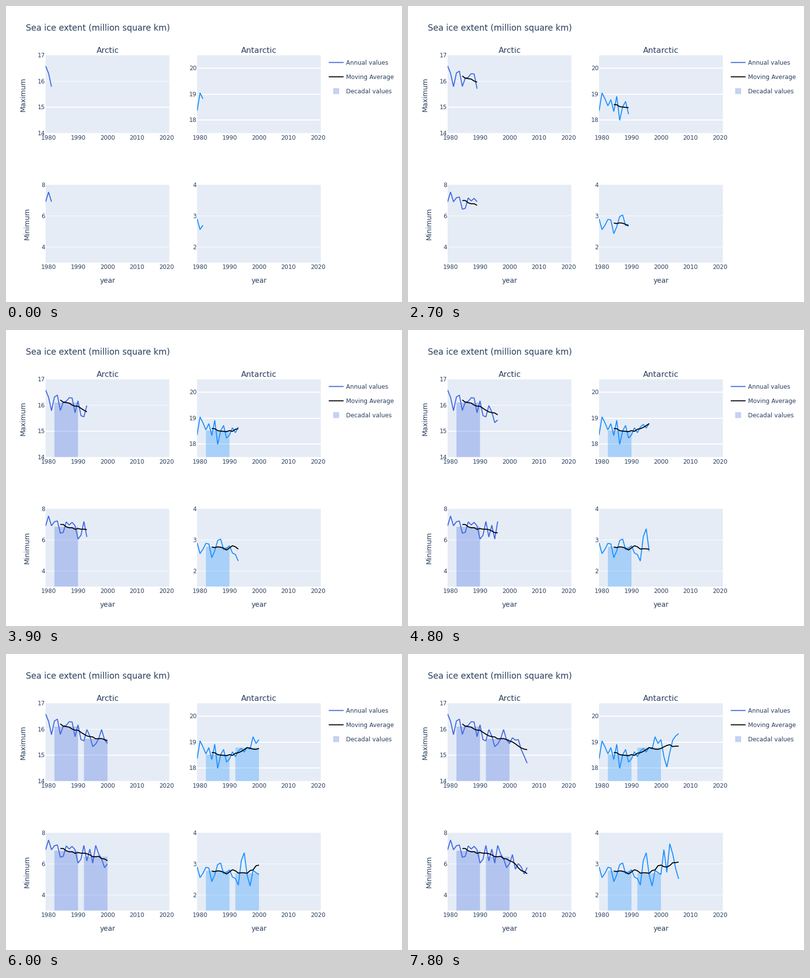
A matplotlib script for the animation above (8 s loop, 800 px wide and 600 px high).

```python
import numpy as np
import matplotlib.pyplot as plt
from matplotlib.animation import FuncAnimation
from matplotlib.patches import Rectangle

plt.rcParams["font.family"] = "DejaVu Sans"

W, H, DPI = 800, 600, 100
INTERVAL, DURATION, STEP = 100, 8000, 300
INK, PANEL = "#2a3f5f", "#e5ecf6"
ROYAL, DODGER = "#4169e1", "#1e90ff"
PLOT_W, PLOT_H = 250, 157.5
FIRST, LAST = 1979, 2021
WINDOW, HALF = 10, 5

# Yearly extents from 1979 to 2010; the last years only feed the moving average.
ARCTIC_MAX = [16.59, 16.31, 15.79, 16.32, 16.39, 15.80, 16.12, 16.15,
              16.29, 16.28, 15.71, 16.17, 15.60, 15.55, 15.99, 15.74,
              15.33, 15.43, 15.63, 15.99, 15.59, 15.45, 15.67, 15.58,
              15.60, 15.21, 14.96, 14.69, 14.77, 15.24, 15.14, 15.25]
ANTARCTIC_MAX = [18.35, 19.05, 18.82, 18.55, 18.79, 18.33, 18.92, 17.99,
                 18.51, 18.72, 18.23, 18.35, 18.63, 18.44, 18.66, 18.76,
                 18.62, 18.80, 18.73, 19.21, 18.95, 19.10, 18.44, 18.04,
                 18.60, 19.08, 19.24, 19.33, 19.05, 18.45, 19.15, 19.07]
ARCTIC_MIN = [6.90, 7.54, 6.91, 7.17, 7.22, 6.43, 6.49, 7.16,
              6.96, 7.13, 6.91, 6.05, 6.30, 7.19, 6.19, 6.95,
              6.05, 7.19, 6.65, 6.33, 5.76, 6.00, 6.60, 5.66,
              6.02, 5.80, 5.35, 5.77, 4.16, 4.59, 5.12, 4.62]
ANTARCTIC_MIN = [2.91, 2.56, 2.70, 2.89, 2.87, 2.43, 2.65, 2.98,
                 3.03, 2.69, 2.73, 2.81, 2.58, 2.53, 2.32, 3.10,
                 3.36, 2.64, 2.29, 2.79, 2.72, 2.66, 3.46, 2.73,
                 3.65, 3.32, 2.85, 2.52, 2.77, 3.70, 2.75, 2.84]

fig = plt.figure(figsize=(W / DPI, H / DPI), dpi=DPI, facecolor="white")
ax = fig.add_axes([0, 0, 1, 1])
ax.set(xlim=(0, W), ylim=(H, 0))
ax.axis("off")


def label(x, y, text, px=12, ha="left", rotation=0):
    ax.text(x, y, text, fontsize=px * 72 / DPI, color=INK, ha=ha,
            va="baseline", rotation=rotation, rotation_mode="anchor", zorder=6)


def box(x, y, w, h, color, alpha=1, zorder=1):
    patch = Rectangle((x, y), w, h, facecolor=color, alpha=alpha,
                      linewidth=0, snap=False, zorder=zorder)
    return ax.add_patch(patch)


def stroke(xs, ys, color, zorder):
    line, = ax.plot(xs, ys, color=color, linewidth=2 * 72 / DPI, snap=False,
                    solid_capstyle="butt", solid_joinstyle="bevel",
                    zorder=zorder)
    return line


class Panel:
    def __init__(self, left, top, low, high, ticks, values, color):
        self.left, self.top, self.low, self.high = left, top, low, high
        self.values = np.array(values)
        self.average = np.convolve(values, np.ones(WINDOW) / WINDOW, "valid")
        bottom = top + PLOT_H

        area = box(left, top, PLOT_W, PLOT_H, PANEL)
        for tick in ticks:
            y = self.y(tick)
            label(left - 1, y + 4.2, str(tick), ha="right")
            if low < tick < high:
                start, end = np.floor(y - 0.5), np.ceil(y + 0.5)
                box(left, start, PLOT_W, end - start, "white", zorder=2)
        for year in range(1980, LAST, 10):
            label(self.x(year), bottom + 13.2, str(year), ha="center")

        self.bars = {}
        for decade_end in (1990, 2000):
            middle = decade_end - 4
            y = self.y(self.average[middle - FIRST - HALF])
            x0, x1 = self.x(middle - 4), self.x(middle + 4)
            self.bars[decade_end] = box(x0, y, x1 - x0, bottom - y,
                                        color, 0.3, 3)
        self.annual = stroke([], [], color, 4)
        self.moving = stroke([], [], "black", 5)
        for line in (self.annual, self.moving):
            line.set_clip_path(area)

    def x(self, year):
        return self.left + (year - FIRST) * PLOT_W / (LAST - FIRST)

    def y(self, value):
        return self.top + (self.high - value) * PLOT_H / (self.high - self.low)

    def show(self, year):
        count = year - FIRST + 1
        xs = self.x(FIRST + np.arange(count))
        self.annual.set_data(xs, self.y(self.values[:count]))
        shown = max(0, count - HALF)
        self.moving.set_data(xs[HALF:], self.y(self.average[:shown]))
        for decade_end, bar in self.bars.items():
            bar.set_visible(year >= decade_end)


panels = [
    Panel(80, 100, 14, 17, range(14, 18), ARCTIC_MAX, ROYAL),
    Panel(386, 100, 17.5, 20.5, range(18, 21), ANTARCTIC_MAX, DODGER),
    Panel(80, 362.5, 3, 8, range(4, 9, 2), ARCTIC_MIN, ROYAL),
    Panel(386, 362.5, 1.5, 4, range(2, 5), ANTARCTIC_MIN, DODGER),
]

label(40, 50, "Sea ice extent (million square km)", 17)
for center, name in ((205.5, "Arctic"), (511, "Antarctic")):
    label(center, 95, name, 16, "center")
    label(center, 560.5, "year", 14, "center")
label(39, 179, "Maximum", 14, "center", 90)
label(47, 441.5, "Minimum", 14, "center", 90)

stroke([652, 682], [114.5] * 2, ROYAL, 4)
stroke([652, 682], [143.5] * 2, "black", 4)
box(661, 166.5, 12, 12, ROYAL, 0.3)
for row, name in enumerate(("Annual values", "Moving Average",
                            "Decadal values")):
    label(687, 119 + 29 * row, name)


def update(frame):
    elapsed = frame * INTERVAL
    year = 1981 + max(0, elapsed // STEP - 1)
    for panel in panels:
        panel.show(year)
    return []


anim = FuncAnimation(fig, update, frames=DURATION // INTERVAL,
                     interval=INTERVAL, repeat=True, repeat_delay=0,
                     blit=False)
plt.show()
```
